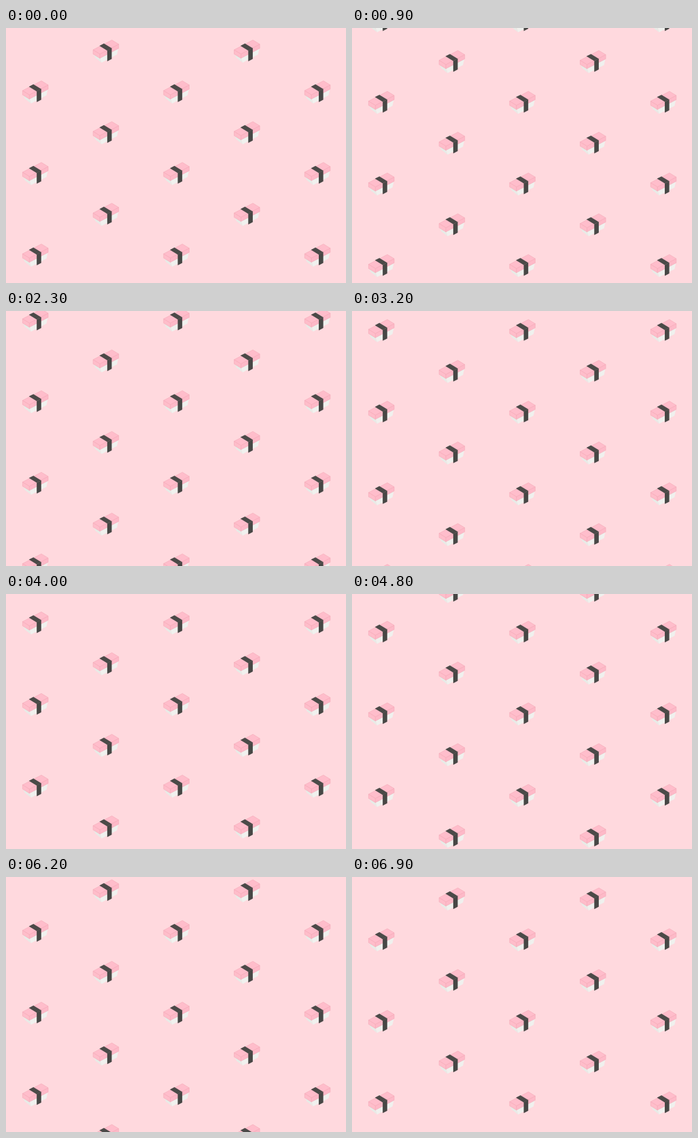
An HTML page with a canvas that plays this animation: 500x375 px, repeating every 7 s.

```html
<!DOCTYPE html>
<html lang="en">
<head>
<meta charset="utf-8">
<title>Musubi pattern</title>
<style>
html, body { margin: 0; width: 100%; height: 100%; overflow: hidden; background: #ffd9de; }
canvas { display: block; width: 500px; height: 375px; }
</style>
</head>
<body>
<canvas id="stage" width="500" height="375"></canvas>
<script>
const ctx = document.getElementById('stage').getContext('2d');
const LOOP = 7000, STEP = 100;
const ROW = 120, COLUMN = 103.7, LEFT = 24.1, TOP = 17.2;
const HAM_DEPTH = 6.2, RICE_DEPTH = 14, BAND_DEPTH = 16.4;

// Isometric point: fractions along and across the block, then pixels down.
const iso = (along, across, down) => [
  0.3 + 27.6 * along + 10 * across,
  14.9 - 14.4 * along + 6.1 * across + down
];

function face(corners, fill, stroke) {
  ctx.beginPath();
  for (const corner of corners) ctx.lineTo(...corner);
  ctx.closePath();
  ctx.fillStyle = fill;
  ctx.fill();
  if (stroke) {
    ctx.strokeStyle = stroke;
    ctx.stroke();
  }
}

const topFace = (a0, a1, c0, c1, down) =>
  [iso(a0, c0, down), iso(a1, c0, down), iso(a1, c1, down), iso(a0, c1, down)];

// Side wall from one top edge to the bottom, pulled in by a taper.
const frontFace = (a0, a1, down, bottom, taper = 0) =>
  [iso(a0, 1, down), iso(a1, 1, down), iso(a1 - taper, 1, bottom), iso(a0 + taper, 1, bottom)];

const endFace = (down, bottom, taper = 0) =>
  [iso(0, 0, down), iso(0, 1, down), iso(taper, 1, bottom), iso(taper, taper, bottom - taper * 16)];

function drawMusubi(x, y) {
  ctx.save();
  ctx.translate(x, y);
  ctx.lineWidth = 0.6;
  ctx.lineJoin = 'round';
  face(endFace(5, RICE_DEPTH, 0.09), '#e8ebe7');
  face(frontFace(0.01, 0.99, 5, RICE_DEPTH, 0.08), '#f0f1ee');
  face(endFace(0, HAM_DEPTH), '#ffbdca', '#f3a9b7');
  face(frontFace(0, 1, 0, HAM_DEPTH), '#feb9c8', '#f3a9b7');
  face(topFace(0, 1, 0, 1, 0), '#ffbdcb', '#f3a9b7');
  face(topFace(0.39, 0.63, -0.15, 1, 0.6), '#4b4a48');
  face(frontFace(0.39, 0.63, 0.4, BAND_DEPTH), '#474745');
  ctx.restore();
}

function draw() {
  const time = Math.floor(performance.now() % LOOP / STEP) * STEP;
  const shift = ROW * time / LOOP;
  ctx.fillStyle = '#ffd9de';
  ctx.fillRect(0, 0, 500, 375);
  for (let column = 0; column < 5; column++) {
    const offset = column % 2 ? 0 : ROW / 2;
    for (let row = -2; row < 4; row++) {
      drawMusubi(LEFT + column * COLUMN, TOP + offset + row * ROW + shift);
    }
  }
  requestAnimationFrame(draw);
}
draw();
</script>
</body>
</html>
```
